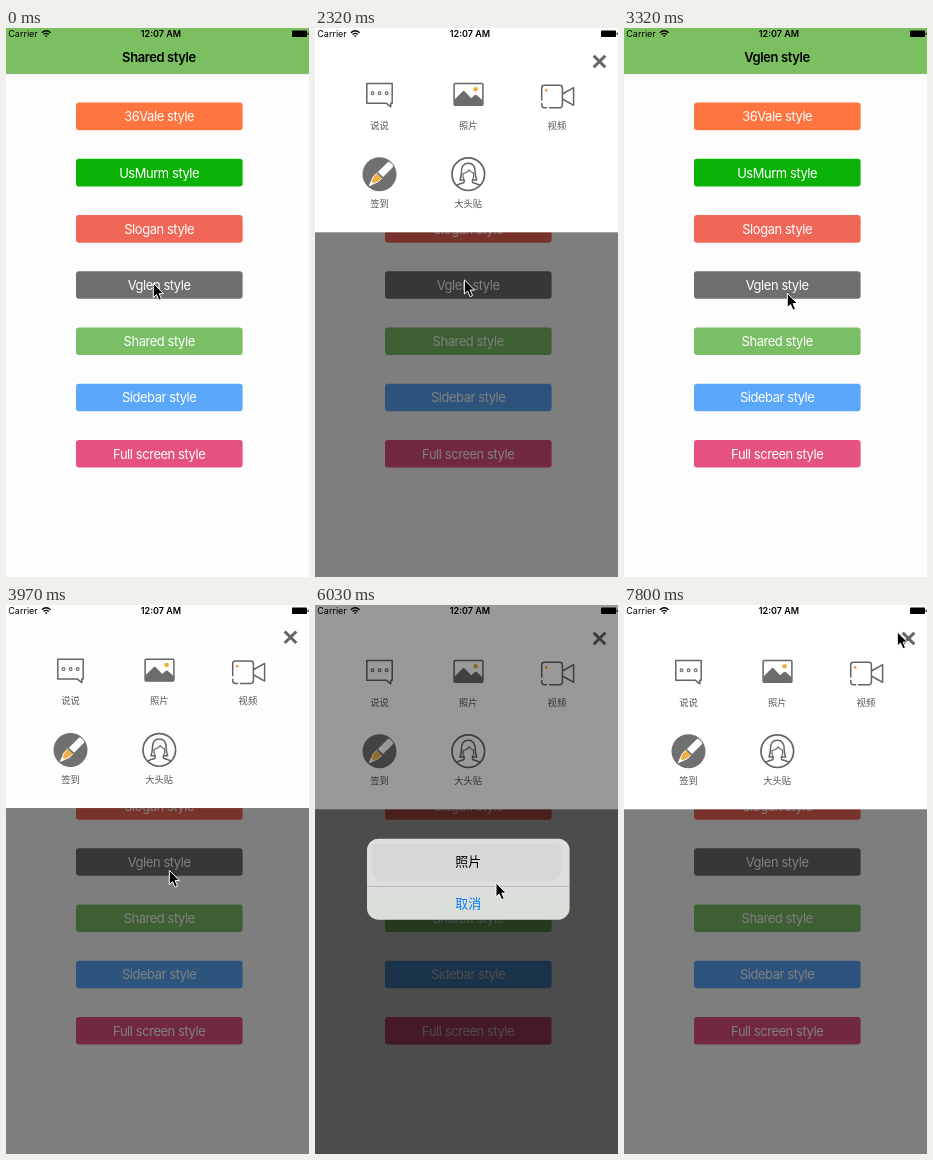
An HTML page for the animation above (8000 ms loop, 303 by 549 pixels).

```html
<!DOCTYPE html>
<html lang="en">
<head>
<meta charset="utf-8">
<title>Menu styles</title>
<style>
  html, body { margin: 0; width: 100%; height: 100%; overflow: hidden; background: #fdfdfd; }
  svg { display: block; width: 100vw; height: 100vh; }
  text { font-family: Inter, Roboto, sans-serif; text-anchor: middle; }
  .label { font-size: 12.9px; letter-spacing: -.4px; fill: #fff; }
  .title { font-size: 12.9px; font-weight: 600; letter-spacing: -.35px; }
  .status { font-size: 9px; }
  .cjk { font-family: "Noto Sans CJK SC", "Noto Sans CJK", "Noto Sans CJK JP", sans-serif; font-size: 9.3px; fill: #555; }
  .alert { font-size: 13px; font-weight: 500; }
  .line { fill: none; stroke: #646464; stroke-width: 1.5; stroke-linejoin: round; stroke-linecap: round; }
</style>
</head>
<body>
<svg viewBox="0 0 303 549">
  <defs>
    <linearGradient id="glass" x2="0" y2="1">
      <stop offset="0" stop-color="#dedede"/>
      <stop offset=".55" stop-color="#dedede"/>
      <stop offset=".85" stop-color="#d9ded7"/>
      <stop offset="1" stop-color="#dcdfdb"/>
    </linearGradient>
  </defs>

  <rect width="303" height="549" fill="#fdfdfd"/>
  <rect width="303" height="46" fill="#7bbf60"/>
  <rect y="45.6" width="303" height=".6" fill="#a5b89c"/>
  <text id="title" class="title" x="153" y="34"></text>
  <g id="buttons"></g>

  <g id="sheet" opacity="0">
    <rect id="shade" width="303" height="900" opacity=".5"/>
    <g id="panel">
      <rect y="-300" width="303" height="504.3" fill="#fff"/>
      <path class="line" style="stroke-width:3;stroke-linecap:butt" d="M278.7 27.7l11.6 11.6m0-11.6l-11.6 11.6"/>

      <path class="line" d="M51.8 55.6h25.4v19.6h-1.4v3.6l-4.6-3.6H51.8z"/>
      <g class="line" style="stroke-width:1.1">
        <circle cx="57.5" cy="65.3" r="1.4"/><circle cx="64.6" cy="65.3" r="1.4"/><circle cx="71.7" cy="65.3" r="1.4"/>
      </g>

      <rect class="line" x="139.1" y="55.6" width="28.8" height="21.6" rx="1"/>
      <path fill="#6c6c6c" d="M139.5 71.5l8.3-8.3q.9-.8 1.7 0l6.7 7 3.7-3.2q.9-.7 1.7 0l6 5.2v5h-28.1z"/>
      <circle cx="160.6" cy="61.2" r="2.3" fill="#efac3c"/>

      <path class="line" d="M226.7 72V60q0-2.7 2.7-2.7h15.3q2.7 0 2.7 2.7v17q0 2.7-2.7 2.7h-10.2m-3 0h-2q-2.8 0-2.8-2.7V75.5M247.4 66l11.2-6.3v17.6l-11.2-6.3"/>
      <circle cx="231.2" cy="62.4" r="1.3" fill="#ef9b3c"/>

      <circle cx="64.5" cy="146.2" r="17" fill="#707070"/>
      <g transform="translate(53.8 158.2) rotate(45)">
        <path fill="#fff" d="M-3.6-30q0-2 2-2H1.6q2 0 2 2V-16.5H-3.6z"/>
        <path fill="#efb04c" d="M-3.6-15H3.6V-10L0-1-3.6-10z"/>
        <path fill="#fff" d="M-1.8-5.3L0 0 1.8-5.3z"/>
        <path fill="none" stroke="#fff" stroke-width=".9" d="M-3.6-15V-10L0-1 3.6-10V-15"/>
      </g>

      <circle class="line" cx="153.3" cy="146.2" r="16.3" style="stroke-width:1.7"/>
      <path class="line" d="M141.8 157.2q3.2-1.6 6.8-2.4.9-.7.6-2.8h-4.3q1.5-3.2 1.5-7.7 0-9 6.9-9t6.9 9q0 4.500 1.500 7.700h-4.300q-.3 2.100.6 2.800 3.600.8 6.800 2.400"/>
      <path class="line" style="stroke-width:1.2" d="M149.200 152q-1.800-2.500-1.200-6.500 4.600-.7 6.100-3.700 1.300 2.600 4.500 3.400.6 4.200-1.200 6.800"/>
      <g id="labels"></g>
    </g>
  </g>

  <g id="dialog" opacity="0">
    <rect width="303" height="549" opacity=".4"/>
    <g id="box">
      <rect x="52" y="233.700" width="202.600" height="81" rx="11.500" fill="url(#glass)"/>
      <path fill="#d5d5d5" opacity=".7" d="M57 245q0-6 6-6H241q6 0 6 6V262q0 15-15 15H72q-15 0-15-15z"/>
      <rect x="52" y="281" width="202.600" height=".7" fill="#a9a9a9"/>
      <text class="cjk alert" x="153.300" y="260.700" style="fill:#000">照片</text>
      <text class="cjk alert" x="153.300" y="303" style="fill:#0a7cff">取消</text>
    </g>
  </g>

  <text class="status" x="17" y="9.300">Carrier</text>
  <g fill="none" stroke="#000" stroke-width="1.300">
    <path d="M35.800 4.700q4.400-3.900 8.800 0M37.600 6.500q2.600-2.300 5.200 0"/>
  </g>
  <path d="M38.900 7.700q1.300-1 2.600 0L40.200 9.200z"/>
  <text class="status" x="155" y="9.300" font-weight="600">12:07 AM</text>
  <rect x="286" y="2.400" width="15" height="6.700" rx=".8"/>
  <rect x="301.600" y="4.400" width="1" height="2.700" rx=".4"/>

  <path id="cursor" fill="#000" stroke="#fff" stroke-width="1" stroke-linejoin="round"
    d="M.3.3V14.600L3.500 11.600 6 17.200 8.500 16.100 6.100 10.600H10.500z"/>
</svg>
<script>
const LOOP = 8000;
const $ = id => document.getElementById(id);

const BUTTONS = [
  ["36Vale", "#ff7540"], ["UsMurm", "#0ab205"], ["Slogan", "#f06757"], ["Vglen", "#6f6f6f"],
  ["Shared", "#7abf66"], ["Sidebar", "#5ba8fb"], ["Full screen", "#e5527f"]
];
$("buttons").innerHTML = BUTTONS.map(([name, color], i) => {
  const y = 74.6 + i * 56.22;
  return `<rect x="70" y="${y}" width="166.6" height="27.6" rx="3" fill="${color}"/>
    <text class="label" x="153.200" y="${y + 18.7}">${name} style</text>`;
}).join("");

$("labels").innerHTML = ["说说", "照片", "视频", "签到", "大头贴"].map((word, i) =>
  `<text class="cjk" x="${64.5 + i % 3 * 88.7}" y="${i < 3 ? 100.5 : 179.3}">${word}</text>`).join("");

// Spans of movement: start, end, number of steps.
const SPANS = [
  [300, 590, 6], [2320, 2670, 7], [2840, 3320, 9], [3790, 4020, 5], [4200, 4880, 13],
  [5230, 6030, 15], [6080, 6470, 8], [6770, 7000, 5], [7230, 7800, 11]
];

// Pointer strokes: start, end, from, control, to.
const STROKES = [
  [2270, 2670, [147, 255], [172, 212], [163, 253]],
  [2960, 3320, [163, 253], [163, 259], [163, 265]],
  [4150, 4880, [163, 265], [222, 172], [160.5, 79.5]],
  [5550, 6030, [160.5, 79.5], [175, 180], [180.7, 277.5]],
  [6030, 6470, [180.7, 277.5], [172, 284], [160, 287.5]],
  [7180, 7800, [160, 287.5], [205, 145], [273, 26.5]]
];

const clamp = v => Math.min(1, Math.max(0, v));
const smooth = p => p * p * (3 - 2 * p);
const easeOut = p => 1 - (1 - p) ** 3;
const ramp = (t, start, length) => clamp((t - start) / length);

function snap(t) {
  let held = 0;
  for (const [a, b, n] of SPANS) {
    if (t < a) break;
    const step = (b - a) / (n - 1);
    held = Math.min(b, a + Math.floor((t - a) / step) * step);
  }
  return held;
}

function pointer(t) {
  const stroke = STROKES.filter(s => t >= s[0]).pop() || STROKES[0];
  const [a, b, from, mid, to] = stroke;
  const p = smooth(ramp(t, a, b - a)), q = 1 - p;
  return from.map((v, i) => q * q * v + 2 * q * p * mid[i] + p * p * to[i]);
}

function set(id, attrs) {
  for (const key in attrs) $(id).setAttribute(key, attrs[key]);
}

function draw(time) {
  const t = snap(time);
  $("title").textContent = (t < 300 ? "Shared" : "Vglen") + " style";

  const open = t < 2700 ? smooth(ramp(t, 300, 250))
    : t < 3700 ? 1 - smooth(ramp(t, 2782, 250))
    : smooth(ramp(t, 3722, 250));
  set("sheet", { opacity: open });
  set("panel", { transform: `translate(0 ${-298 * (1 - open)})` });

  const shown = easeOut(ramp(t, 5180, 400));
  const gone = smooth(ramp(t, 6720, 280));
  const scale = 1.2 - 0.2 * shown;
  set("dialog", { opacity: shown * (1 - gone) });
  set("box", { transform: `translate(153.300 274.200) scale(${scale}) translate(-153.300 -274.200)` });

  set("cursor", { transform: `translate(${pointer(t).join(" ")})` });
}

const begin = performance.now();
function tick() {
  draw((performance.now() - begin) % LOOP);
  requestAnimationFrame(tick);
}
tick();
</script>
</body>
</html>
```
